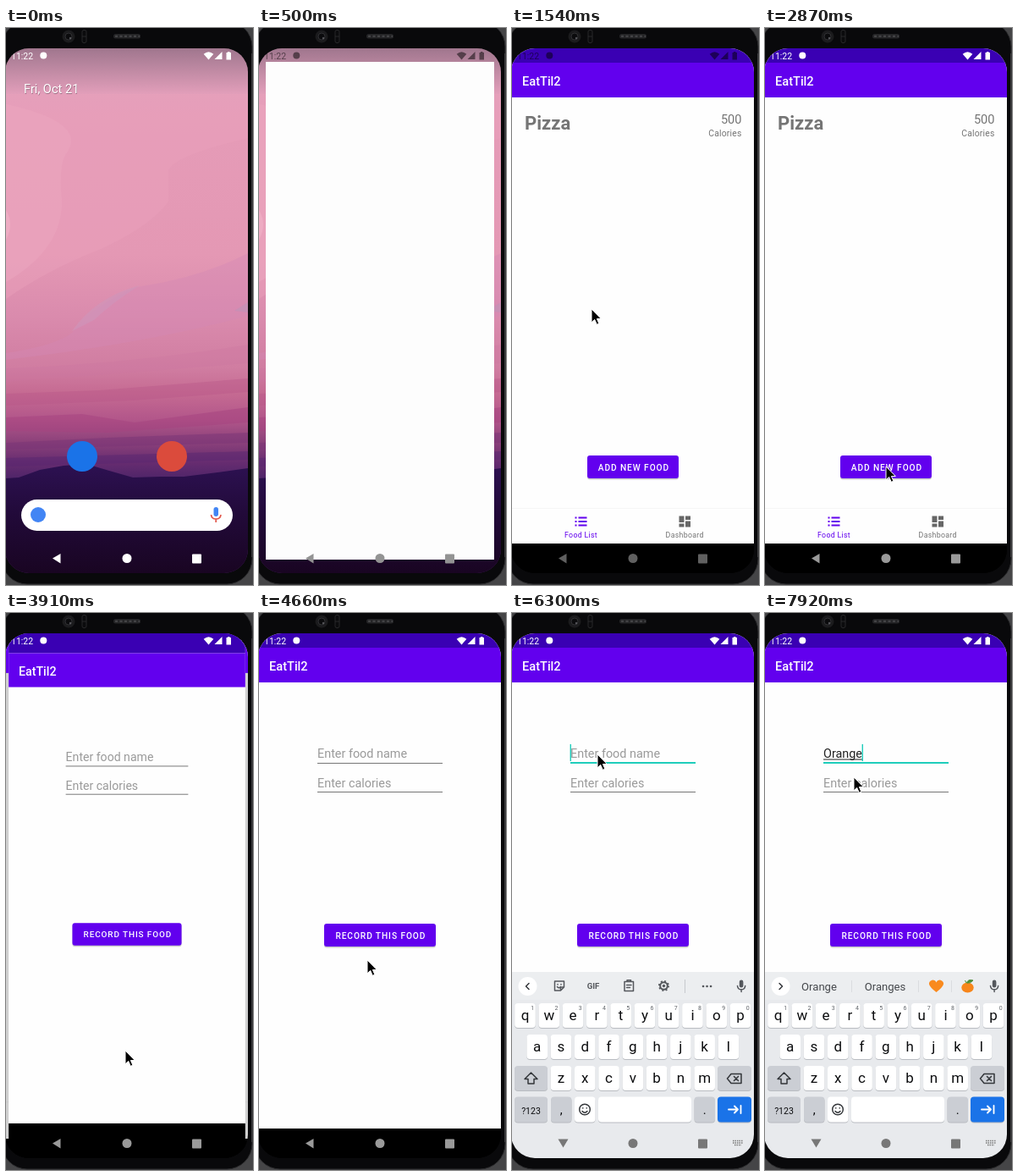
Recreate the animation shown at these times as an HTML page. Size 292 by 658 pixels, loop 8 s.

```html
<!DOCTYPE html>
<html lang="en">
<head>
<meta charset="utf-8">
<title>Food log on a phone</title>
<style>
html, body { margin: 0; width: 100%; height: 100%; overflow: hidden; background: #0a0a0c; }
svg { display: block; width: 292px; height: 658px; font-family: Roboto, sans-serif; }
.btn { font-size: 10.2px; font-weight: 500; letter-spacing: .91px; fill: #fff; text-anchor: middle; }
.tab { font-size: 8.8px; letter-spacing: .29px; text-anchor: middle; }
.title { font-size: 14.6px; font-weight: 500; fill: #fff; }
.field { font-size: 14.4px; }
.hint { fill: #9a9a9a; }
.key { font-size: 17px; fill: #0c0d0f; text-anchor: middle; }
.num { font-size: 7px; fill: #5f6368; text-anchor: middle; }
.word { font-size: 13.1px; fill: #45484c; text-anchor: middle; }
.line { fill: none; stroke: #54575c; stroke-width: 1.5; stroke-linecap: round; stroke-linejoin: round; }
.line.dark { stroke: #33363a; }
</style>
</head>
<body>
<svg viewBox="0 0 292 658">
  <defs>
    <clipPath id="screen"><rect x="-1" y="24" width="287" height="620" rx="28"/></clipPath>
    <linearGradient id="sky" gradientUnits="userSpaceOnUse" x1="0" y1="24" x2="0" y2="534">
      <stop offset="0" stop-color="#dfa2bd"/><stop offset=".2" stop-color="#e59bb7"/>
      <stop offset=".48" stop-color="#e498b4"/><stop offset=".62" stop-color="#da8bad"/>
      <stop offset=".74" stop-color="#d07da1"/><stop offset=".8" stop-color="#c56a92"/>
      <stop offset=".86" stop-color="#b2568a"/><stop offset=".91" stop-color="#8d427b"/>
      <stop offset=".96" stop-color="#662c70"/><stop offset="1" stop-color="#4d2468"/>
    </linearGradient>
    <linearGradient id="hill" x1="0" y1="0" x2="0" y2="1">
      <stop offset="0" stop-color="#2d1152"/><stop offset=".45" stop-color="#220a3a"/><stop offset="1" stop-color="#190522"/>
    </linearGradient>
    <linearGradient id="shade" x1="0" y1="0" x2="0" y2="1">
      <stop offset="0" stop-color="#30283a" stop-opacity=".36"/><stop offset="1" stop-color="#30283a" stop-opacity="0"/>
    </linearGradient>
  </defs>

  <rect width="292" height="658" fill="#454547"/>
  <rect x="-5" y="-8" width="296" height="665" rx="30" fill="#09090b" stroke="#2c2c2e"/>
  <path d="M290.5 30V625" stroke="#3b3b3d"/>
  <circle cx="74" cy="10" r="7.5" fill="#1b1b1d"/>
  <circle cx="74" cy="10" r="4" fill="#0b0b0d" stroke="#303033"/>
  <circle cx="76" cy="12" r="1.2" fill="#55555a"/>
  <rect x="90" y="2.5" width="5" height="15" rx="2" fill="#0b0b0d" stroke="#29292b"/>
  <path d="M90 10H95" stroke="#29292b"/>
  <rect x="127" y="7" width="32" height="5.5" rx="2.5" fill="#252527"/>
  <path d="M129 9.8H158" stroke="#47474a" stroke-width="2" stroke-dasharray="3 2.5"/>

  <g clip-path="url(#screen)">
    <rect y="24" width="286" height="620" fill="#000"/>

    <g id="wall">
      <rect y="24" width="286" height="620" fill="url(#sky)"/>
      <path d="M0 78H286V130Q200 150 192 168V205Q170 235 110 262Q50 285 0 320Z" fill="#e8a0bb" opacity=".45"/>
      <path d="M0 90Q100 112 70 150Q62 165 66 205Q66 262 0 300Z" fill="#eba5bf" opacity=".6"/>
      <path d="M0 215Q10 232 0 250Z" fill="#eeacc3"/>
      <path d="M78 360Q105 325 155 306Q230 295 286 266V340Q170 372 0 392V384Q60 375 78 360Z" fill="#d388b3" opacity=".4"/>
      <path d="M78 358Q106 318 158 304Q125 325 104 345Z" fill="#cf96bb" opacity=".6"/>
      <path d="M270 334L286 324V336Z" fill="#b895ba" opacity=".5"/>
      <path d="M0 402Q150 396 286 374V396Q140 408 0 418Z" fill="#cb749f" opacity=".3"/>
      <path d="M0 432L110 428 286 414V430L150 440 0 446Z" fill="#b65588" opacity=".4"/>
      <path d="M0 460L90 456 152 466 286 448V466L120 478 0 476Z" fill="#a64380" opacity=".5"/>
      <path d="M0 490L120 484 286 478V490L0 498Z" fill="#7a3477" opacity=".5"/>
      <path d="M0 508L286 500V510L0 518Z" fill="#592770" opacity=".5"/>
      <path d="M0 532L15 531 40 522 68 517 95 515 122 523 150 531 182 530 210 530 250 525 286 520V644H0Z" fill="url(#hill)"/>
      <rect y="24" width="286" height="54" fill="url(#shade)"/>
    </g>

    <g id="home">
      <text x="21.5" y="77.5" font-size="14.6" fill="#5b3a4c" opacity=".5">Fri, Oct 21</text>
      <text x="21" y="77" font-size="14.6" fill="#fff">Fri, Oct 21</text>
      <circle cx="90" cy="506" r="18" fill="#1a73e8"/>
      <circle cx="196" cy="506" r="18" fill="#db4b3c"/>
      <rect x="18" y="557" width="250" height="37" rx="18.5" fill="#fff"/>
      <circle cx="38" cy="575" r="9" fill="#4285f4"/>
      <rect x="245.5" y="566" width="5.5" height="11" rx="2.75" fill="#4285f4"/>
      <path d="M242.5 575Q243 580 248.2 580Q253.5 580 254 575M248.2 580V584" fill="none" stroke="#e2574a" stroke-width="1.7"/>
    </g>

    <rect id="splash" fill="#fdfdfd"/>

    <g id="list">
      <rect y="24" width="286" height="585" fill="#fefefe"/>
      <rect y="0" width="286" height="41" fill="#3a00b3"/>
      <rect y="41" width="286" height="41" fill="#6200ee"/>
      <text class="title" x="12" y="68">EatTil2</text>
      <text x="15" y="120" font-size="22" font-weight="700" fill="#757575">Pizza</text>
      <text x="271.5" y="113" font-size="14.6" fill="#757575" text-anchor="end">500</text>
      <text x="271.5" y="128" font-size="10.4" letter-spacing=".18" fill="#757575" text-anchor="end">Calories</text>
      <rect x="89" y="506.5" width="108" height="27" rx="3" fill="#000" opacity=".2"/>
      <rect id="addBtn" x="89" y="505" width="108" height="27" rx="3" fill="#6200ee"/>
      <text class="btn" x="143.9" y="522.5">ADD NEW FOOD</text>
      <path d="M0 567.5H286" stroke="#000" opacity=".03"/>
      <path d="M74.5 578.5h2m2 0h10m-14 4.5h2m2 0h10m-14 4.5h2m2 0h10" stroke="#6200ee" stroke-width="1.8"/>
      <text class="tab" x="81.5" y="602" fill="#6200ee">Food List</text>
      <path d="M197.5 576.5h6v7.5h-6zM205 576.5h6v4.500h-6zM197.5 585.5h6v4h-6zM205 582.5h6v7h-6z" fill="#666"/>
      <text class="tab" x="204.2" y="602" fill="#757575">Dashboard</text>
      <rect y="609" width="286" height="90" fill="#000"/>
      <rect id="dim" x="-20" y="82" width="326" height="527" fill="#000" opacity=".18"/>
    </g>

    <g id="form">
      <rect y="24" width="286" height="585" fill="#fefefe"/>
      <rect y="0" width="286" height="41" fill="#3a00b3"/>
      <rect y="41" width="286" height="41" fill="#6200ee"/>
      <text class="title" x="12" y="68">EatTil2</text>
      <text id="name" class="field" x="69" y="171"></text>
      <rect id="compose" x="69" y="172.5" height="1" fill="#222"/>
      <rect id="rule" x="69" width="148"/>
      <rect id="caret" y="155" width="1.4" height="20" fill="#1fcdbb"/>
      <text class="field hint" x="69" y="206">Enter calories</text>
      <rect x="69" y="211" width="148" height="1" fill="#767676"/>
      <rect x="77" y="368.5" width="132" height="27" rx="3" fill="#000" opacity=".2"/>
      <rect x="77" y="367" width="132" height="27" rx="3" fill="#6200ee"/>
      <text class="btn" x="143.9" y="384.5">RECORD THIS FOOD</text>
      <rect y="609" width="286" height="90" fill="#000"/>
    </g>

    <g id="board">
      <rect y="424" width="286" height="300" fill="#e8eaed"/>
      <rect y="424" width="286" height="33" fill="#eceef0"/>
      <g id="keys"></g>
      <circle cx="18.5" cy="441" r="11" fill="#fff"/>
      <path id="chevron" class="line dark"/>
      <g id="tools">
        <path class="line" d="M50.5 435h11v7l-4 4h-7zM61.5 442h-4v4M53.5 441.5q2 2.5 4 0M54 438.5v.4M58 438.5v.4"/>
        <text x="96" y="444" font-size="9.6" font-weight="700" fill="#54575c" text-anchor="middle">GIF</text>
        <path class="line" d="M133 435.5h10.5v11H133zM136 435.5v-1.8h4.5v1.8zM135.5 439.5h5.5M135.5 442.5h4"/>
        <circle class="line" cx="179.5" cy="440.5" r="4.3" style="stroke-width:2"/>
        <circle class="line" cx="179.5" cy="440.5" r="5.6" style="stroke-width:1.8;stroke-dasharray:1.9 2.5;stroke-linecap:butt"/>
        <circle cx="179.5" cy="440.5" r="1.7" fill="#54575c"/>
        <path d="M204.5 433V449" stroke="#c6c9cd"/>
        <path d="M226 441h.1M230.5 441h.1M235 441h.1" stroke="#54575c" stroke-width="2.6" stroke-linecap="round"/>
      </g>
      <g id="words">
        <text id="word1" class="word" x="64" y="446"></text>
        <text id="word2" class="word" x="142" y="446"></text>
        <path d="M102.5 434V448M181.5 434V448M220.5 434V448" stroke="#dadce0"/>
        <g id="emoji">
          <path d="M202.5 448Q188 437 198 433.5Q201.5 433.5 202.5 436.5Q203.5 433.5 207 433.5Q217 437 202.5 448Z" fill="#f98a1e"/>
          <ellipse cx="239.5" cy="442.5" rx="7.2" ry="6" fill="#f7861b"/>
          <path d="M238.5 437Q240 432 246 434Q243 438 238.5 437ZM238 437L236.5 434" fill="#4f8f3a" stroke="#4f8f3a"/>
        </g>
      </g>
      <rect x="268.8" y="433.5" width="4.6" height="9" rx="2.3" fill="#54575c"/>
      <path class="line" d="M266.5 440.5Q267 444.8 271.1 444.8Q275.3 444.8 275.7 440.5M271.1 445V447.5"/>
      <path class="line dark" d="M22.5 543L30 550.5H26V556H19V550.5H15Z"/>
      <path class="line dark" d="M259 544.5H271V555.5H259L254.5 550ZM262.5 547.5L267.5 552.5M267.5 547.5L262.5 552.5"/>
      <circle class="line dark" cx="86" cy="586.5" r="6.3"/>
      <path class="line dark" d="M83 588.5Q86 592 89 588.5M83.8 584.8v.1M88.2 584.8v.1"/>
      <path class="line" style="stroke:#fff;stroke-width:1.8" d="M256 586.5H267M263 582.5L267 586.5 263 590.5M270.5 582V591"/>
    </g>
    <rect id="navDim" y="609" width="286" height="35" fill="#000" opacity=".2"/>

    <g id="nav">
      <path id="back"/>
      <circle cx="143" cy="626.5" r="5.5"/>
      <rect id="recent" x="220" y="621.5" width="11" height="11" rx="1"/>
      <path id="kbIcon" d="M261 623.5h12M261 626h12M263 628.5h8" fill="none" stroke="#777" stroke-width="1.5" stroke-dasharray="1.5 1"/>
    </g>

    <g id="status">
      <text x="6" y="37" font-size="10.5">11:22</text>
      <circle cx="44.3" cy="32.5" r="4"/>
      <path d="M239.5 37.5L233.7 30.8Q239.5 25.8 245.3 30.8Z"/>
      <path d="M255.5 28V37H246.5Z"/>
      <path d="M260.5 29H262V28h2.5v1H266v8.5H260.5Z"/>
    </g>
  </g>

  <path id="mouse" d="M0 0V15.8L3.7 12.4 6.3 18.3 8.9 17.2 6.4 11.5H11.3Z" fill="#000" stroke="#fff" stroke-width="1"/>
</svg>
<script>
const $ = id => document.getElementById(id);
const set = (id, attrs) => { for (const a in attrs) $(id).setAttribute(a, attrs[a]); };
const show = (id, on) => { $(id).style.display = on ? '' : 'none'; };
const zoom = (id, s) => set(id, { transform: `translate(143 334) scale(${s}) translate(-143 -334)` });

const LOOP = 8000, FIRST = 500, STEP = 148.2, LAST = 50;
const PITCH = 28.28, WORD = 'Orange';

function key(x, y, w, fill, label, size, h = 29) {
  const text = label ? `<text class="key" x="${x + w / 2}" y="${y + h / 2 + 5.5}"${size ? ` style="font-size:${size}px"` : ''}>${label}</text>` : '';
  return `<rect x="${x}" y="${y + 1}" width="${w}" height="${h}" rx="4" fill="#b9bcc1"/>` +
    `<rect x="${x}" y="${y}" width="${w}" height="${h}" rx="4" fill="${fill}"/>` + text;
}

function buildKeys() {
  const white = '#fff', grey = '#cbced4';
  let out = '';
  [['qwertyuiop', 15.5, 461], ['asdfghjkl', 29.7, 498], ['zxcvbnm', 58, 535]].forEach(([row, x0, y], r) => {
    [...row].forEach((c, i) => {
      const x = x0 + i * PITCH;
      out += key(x - 12.3, y, 24.6, white, c);
      if (!r) out += `<text class="num" x="${x + 8.6}" y="${y + 8}">${(i + 1) % 10}</text>`;
    });
  });
  out += key(3, 535, 39, grey) + key(243, 535, 40, grey);
  out += key(3, 571.5, 39, grey, '?123', 10.5, 30) + key(46, 571.5, 24.5, grey, ',', 15, 30);
  out += key(74, 571.5, 24.5, white, '', 0, 30) + key(102, 571.5, 110, white, '', 0, 30);
  out += key(215.5, 571.5, 24.5, grey, '.', 15, 30) + key(243, 571.5, 40, '#1a73e8', '', 0, 30);
  $('keys').innerHTML = out;
}

// pointer path: [step, x, y]
const PATH = [[6, 78, 275], [7, 94, 332], [9, 124, 440], [11, 146, 512], [12, 146, 512], [14, 147, 517],
  [15, 145, 519], [17, 141, 517], [26, 141, 517], [28, 128, 410], [30, 105, 215], [31, 101, 167],
  [47, 101, 167], [49, 101, 183], [50, 105, 194]];

function pointer(k) {
  const i = PATH.findIndex(p => p[0] >= k);
  if (i < 1) return PATH[0].slice(1);
  const [a, b] = [PATH[i - 1], PATH[i]], u = (k - a[0]) / (b[0] - a[0]);
  return [a[1] + (b[1] - a[1]) * u, a[2] + (b[2] - a[2]) * u];
}

function drawField(k) {
  const focus = k >= 32, typed = WORD.slice(0, Math.max(0, k - 41));
  const name = $('name');
  name.textContent = typed || 'Enter food name';
  name.setAttribute('fill', typed ? '#222' : '#9a9a9a');
  const w = typed ? name.getComputedTextLength() : 0;
  set('compose', { width: w });
  set('rule', focus ? { y: 176, height: 2, fill: '#1fcdbb' } : { y: 177, height: 1, fill: '#767676' });
  set('caret', { x: 68.6 + w });
  show('caret', focus && (k < 36 || k >= 39));
  show('tools', !typed);
  show('words', typed);
  show('emoji', typed === WORD);
  set('chevron', { d: typed ? 'M17 437.5L20.5 441 17 444.5' : 'M20 437.5L16.5 441 20 444.5' });
  $('word1').textContent = typed;
  $('word2').textContent = typed === WORD ? 'Oranges' : WORD;
}

function draw(ms) {
  const t = ms % LOOP;
  const k = t < FIRST ? -1 : Math.min(LAST, Math.floor((t - FIRST) / STEP + .02));
  const app = k >= 4, form = k >= 22, board = k >= 32;

  show('wall', !app);
  show('home', k < 0);
  show('splash', k >= 0 && !app);
  const gap = [1, .25, 0][Math.min(Math.max(k, 0), 2)];
  set('splash', { x: 8 * gap, y: 24 + 16 * gap, width: 286 - 16 * gap, height: 620 - 32 * gap });

  show('list', app && k < 25);
  show('dim', form);
  zoom('list', k === 22 ? 1.025 : form ? 1.044 : 1);
  set('addBtn', { fill: k === 21 ? '#8133f1' : '#6200ee' });
  show('form', form);
  zoom('form', { 22: .92, 23: .978, 24: .996 }[k] || 1);
  set('form', { opacity: k === 22 ? .6 : 1 });
  if (form) drawField(k);

  const drop = { 32: 145, 33: 51, 34: 14, 35: 3 }[k] || 0;
  show('board', board);
  set('board', { transform: `translate(0 ${drop})` });
  show('navDim', board && drop > 10);

  const settled = k >= 35, rising = board && !settled;
  const nav = k < 0 ? '#fff' : !app ? '#939393' : k < 8 ? '#606060' : !board ? '#9a9a9a' : settled ? '#777' : '#c4c4c4';
  set('nav', { fill: nav });
  set('back', { d: settled ? 'M54.5 621.5H66.5L60.5 631.5Z' : 'M55 626.5L64.5 621V632.5Z' });
  show('back', !rising);
  show('recent', !rising);
  show('kbIcon', settled);

  const dark = k >= 0 && k < 8;
  set('status', { fill: dark ? '#000' : '#fff', opacity: dark ? .5 : 1 });

  show('mouse', k >= 6);
  const [x, y] = pointer(k);
  set('mouse', { transform: `translate(${x} ${y})` });
}

buildKeys();
const start = performance.now();
function tick() {
  draw(performance.now() - start);
  requestAnimationFrame(tick);
}
tick();
</script>
</body>
</html>
```
